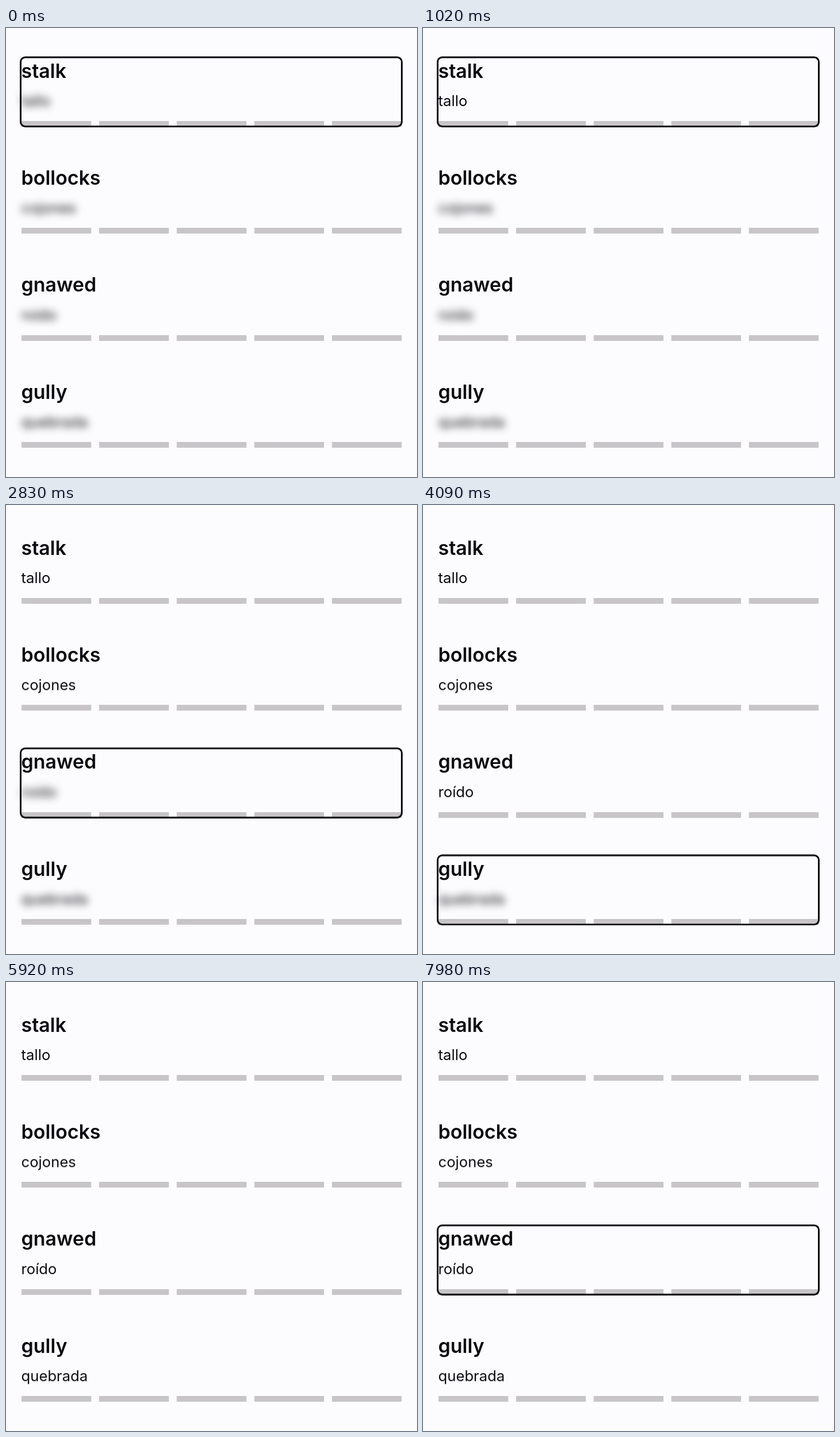
Recreate the animation shown at these times as an HTML page. Size 716 by 782 pixels, loop 8000 ms.

```html
<!DOCTYPE html>
<html lang="en">
<head>
<meta charset="utf-8">
<title>Word cards</title>
<style>
  html, body { margin: 0; width: 716px; height: 782px; overflow: hidden; background: #fcfcfe; }
  svg { display: block; }
  text { font-family: Inter, Roboto, sans-serif; fill: #0b0a0f; }
  .word { font-size: 34px; font-weight: 600; }
  .meaning { font-size: 25.7px; font-weight: 400; animation: 8s ease infinite; }
  .bar { fill: #c8c5c9; }
  .focus {
    fill: none; stroke: #08070c; stroke-width: 3;
    animation: focus 8s step-end infinite;
  }

  .m0 { animation-name: reveal0; }
  .m1 { animation-name: reveal1; }
  .m2 { animation-name: reveal2; }
  .m3 { animation-name: reveal3; }
  @keyframes reveal0 { 0%, 10.75%  { filter: blur(7px); } 12.6%, 100%   { filter: blur(0); } }
  @keyframes reveal1 { 0%, 26%     { filter: blur(7px); } 27.875%, 100% { filter: blur(0); } }
  @keyframes reveal2 { 0%, 45.75%  { filter: blur(7px); } 47.625%, 100% { filter: blur(0); } }
  @keyframes reveal3 { 0%, 66.5%   { filter: blur(7px); } 68.375%, 100% { filter: blur(0); } }

  /* Focus steps down the list, leaves it, then comes back from below. */
  @keyframes focus {
    0%      { transform: translateY(0); opacity: 1; }
    15.625% { transform: translateY(186.4px); opacity: 1; }
    30.625% { transform: translateY(372.8px); opacity: 1; }
    50.25%  { transform: translateY(559.2px); opacity: 1; }
    70.5%   { transform: translateY(559.2px); opacity: 0; }
    88.25%  { transform: translateY(559.2px); opacity: 1; }
    93.5%, 100% { transform: translateY(372.8px); opacity: 1; }
  }
</style>
</head>
<body>
<svg width="716" height="782" viewBox="0 0 716 782">
  <defs>
    <g id="bars" class="bar">
      <rect x="27" y="162" width="121.5" height="10"/>
      <rect x="162.2" y="162" width="121.5" height="10"/>
      <rect x="297.4" y="162" width="121.5" height="10"/>
      <rect x="432.6" y="162" width="121.5" height="10"/>
      <rect x="567.8" y="162" width="121.5" height="10"/>
    </g>
  </defs>
  <g>
    <text class="word" x="26.5" y="86.5">stalk</text>
    <text class="meaning m0" x="26.5" y="136">tallo</text>
    <use href="#bars"/>
  </g>
  <g transform="translate(0 186.4)">
    <text class="word" x="26.5" y="86.5">bollocks</text>
    <text class="meaning m1" x="26.5" y="136">cojones</text>
    <use href="#bars"/>
  </g>
  <g transform="translate(0 372.8)">
    <text class="word" x="26.5" y="86.5">gnawed</text>
    <text class="meaning m2" x="26.5" y="136">roído</text>
    <use href="#bars"/>
  </g>
  <g transform="translate(0 559.2)">
    <text class="word" x="26.5" y="86.5">gully</text>
    <text class="meaning m3" x="26.5" y="136">quebrada</text>
    <use href="#bars"/>
  </g>
  <rect class="focus" x="25.5" y="51" width="664" height="120.5" rx="8"/>
</svg>
</body>
</html>
```
